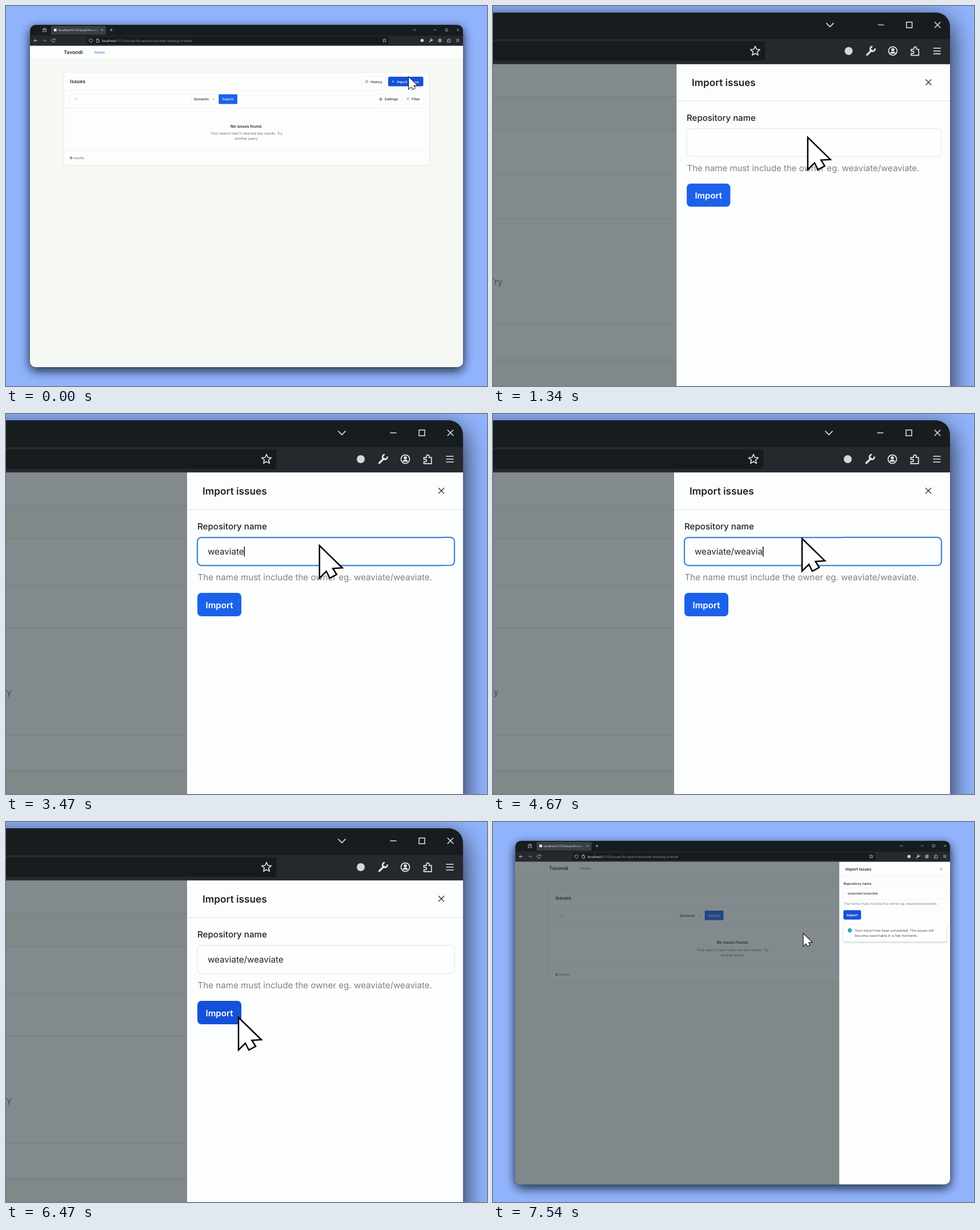
An HTML page that plays this animation: 842 by 665 pixels, repeating every 7600 ms.

```html
<!DOCTYPE html>
<html lang="en">
<head>
<meta charset="utf-8">
<title>Import issues</title>
<style>
  html, body { margin: 0; width: 100%; height: 100%; overflow: hidden; background: #90b3fc; }
  svg { display: block; width: 842px; height: 665px; }
  text { font-family: Inter, "Open Sans", sans-serif; text-rendering: geometricPrecision; white-space: pre; }
  .noto { font-family: "Noto Sans", "Open Sans", sans-serif; }
</style>
</head>
<body>
<svg id="stage" viewBox="0 0 842 665" xmlns="http://www.w3.org/2000/svg"></svg>
<script>
const LOOP = 7600;
const SM = 6.05; // small text size
const BLUE = '#1c61ea', HOVER = '#1551d8';

// ---- markup helpers ----
const rect = (x, y, w, h, fill, rx = 0, more = '') =>
  `<rect x="${x}" y="${y}" width="${w}" height="${h}" rx="${rx}" fill="${fill}" ${more}/>`;
const text = (x, y, str, fill, size = SM, weight = 400, more = '') =>
  `<text x="${x}" y="${y}" font-size="${size}" font-weight="${weight}" fill="${fill}" ${more}>${str}</text>`;
const line = (d, stroke, w = 0.6, more = '') =>
  `<path d="${d}" fill="none" stroke="${stroke}" stroke-width="${w}" ${more}/>`;
const ring = (x, y, r, stroke, w = 0.6) =>
  `<circle cx="${x}" cy="${y}" r="${r}" fill="none" stroke="${stroke}" stroke-width="${w}"/>`;
const cross = (x, y, r, stroke, w) =>
  line(`M${x - r} ${y - r}l${2 * r} ${2 * r}M${x + r} ${y - r}l${-2 * r} ${2 * r}`, stroke, w);
const plus = (x, y, r, stroke, w) =>
  line(`M${x - r} ${y}h${2 * r}M${x} ${y - r}v${2 * r}`, stroke, w);
const chevron = (x, y, r, stroke, w) =>
  line(`M${x - r} ${y - r / 2}l${r} ${r}l${r} ${-r}`, stroke, w);
const button = (x, y, w, h) => rect(x, y, w, h, '#fdfefe', 2.5, 'stroke="#eceef0" stroke-width=".5"');
const rule = (x, y, w) => rect(x, y, w, 0.5, '#e3e7e9');

function browser() {
  const c = '#e4e6e8', dim = '#8b9094', y = 60.2;
  const spikes = Array.from({ length: 10 }, (_, i) => {
    const r = i % 2 ? 1.6 : 3.5, a = i * Math.PI / 5 - Math.PI / 2;
    return `${(662.4 + r * Math.cos(a)).toFixed(2)} ${(60.3 + r * Math.sin(a)).toFixed(2)}`;
  });
  return rect(42, 33, 758, 19, '#171c1f') + rect(42, 51.8, 758, 17.7, '#25292d')
    // tabs
    + line('M64.5 40.5h6v4.4h-6zM65.3 39h4.4M66.3 42.2h2.4', c, 0.7)
    + rect(79, 34.8, 96, 15.4, '#3a3f43', 2)
    + rect(84, 39.8, 4.4, 4.4, '#fff')
    + text(92, 44, 'localhost:5173/issues?hs-sear', 'url(#fade)', 4.96, 400, 'class="noto"')
    + cross(168, 42, 1.6, c, 0.6) + plus(184.3, 42, 2.4, c, 0.7)
    // window controls
    + chevron(715.2, 41.8, 2.6, c, 0.7) + line('M749 41.8h4.4', c, 0.6)
    + line('M769.2 39.8h4v4h-4z', c, 0.6) + cross(791.2, 41.8, 2.1, c, 0.6)
    // navigation
    + line('M55 60.5h-6M51.6 57.9l-2.6 2.6l2.6 2.6', c, 0.8)
    + line('M64.5 60.5h6M67.9 57.9l2.6 2.6l-2.6 2.6', dim, 0.7)
    + line('M85.4 58.6a3 3 0 1 0 .5 2.6M86 57.3v2h-2', c, 0.7)
    // address
    + rect(142, 53.4, 527.4, 13.6, '#171b1e', 1.5)
    + line('M148.5 57.4l2.8 1v2q0 2.2-2.8 3.4q-2.8-1.2-2.8-3.4v-2z', c, 0.7)
    + line('M158.4 57.5h2.6l1.8 1.8v4.2h-4.4zM160.8 57.5v2h2', c, 0.7)
    + text(168, 62.7, 'localhost<tspan fill="#8e9397">:5173/issues?hs-search-box-with-loading-5=test#</tspan>',
        '#eceef0', 5.82, 400, 'class="noto"')
    + line(`M${spikes.join('L')}z`, c, 0.65, 'stroke-linejoin="round"')
    // tools
    + `<circle cx="728.4" cy="${y}" r="2.8" fill="#d5d8da"/>`
    + line('M741.4 62.9l3.2-3.2', c, 1.3, 'stroke-linecap="round"')
    + line('M747 58.4a1.7 1.7 0 1 1-1.8-1.4', c, 1.1)
    + ring(759.6, y, 3, c, 0.7) + `<circle cx="759.6" cy="59.3" r="1.1" fill="${c}"/>`
    + `<path d="M757.6 62a2 1.4 0 0 1 4 0z" fill="${c}"/>`
    + line('M772.6 59h1.8v-.8a.9.9 0 0 1 1.9 0v.8h1.6v4.3h-5.3v-1.3h1a.8.8 0 0 0 0-1.7h-1z', c, 0.7)
    + line('M788.2 58.2h5.2M788.2 60.2h5.2M788.2 62.2h5.2', c, 0.65);
}

function page() {
  const ink = '#23272b', grey = '#666b70', ic = '#50565b';
  return rect(42, 69.4, 758, 563, '#f6f8f4') + rect(42, 69.4, 758, 23.4, '#fcfdfd') + rule(42, 92.4, 758)
    + text(101, 84, 'Tavondi', ink, 8.7, 600) + text(154.3, 83.3, 'Issues', '#2f7fd6', SM, 500)
    + rect(101.5, 117, 639.5, 161.2, '#cfd5d5', 3, 'filter="url(#soft)" opacity=".7"')
    + rect(101.5, 116.6, 639.5, 161.4, '#fcfdfd', 3, 'stroke="#e9ecec" stroke-width=".4"')
    + rule(101.5, 147.6, 639.5) + rule(101.5, 178.2, 639.5) + rule(101.5, 253.2, 639.5)
    + text(112, 135.3, 'Issues', ink, 8.64, 600)
    + button(622, 124, 42, 16.4) + ring(631.5, 132.2, 2.3, ic) + line('M631.5 130.8v1.6h1.2', ic, 0.5)
    + text(638, 134.5, 'History', ink, SM, 500)
    + rect(669, 123.8, 61.5, 16.6, HOVER, 2.5) + plus(677.5, 132.2, 2, '#fff', 0.6)
    + text(684, 134.5, 'Import issues', '#fff', SM, 500)
    + rect(112, 154.8, 260, 16.6, '#fdfefe', 2.5, 'stroke="#e3e6e8" stroke-width=".5"')
    + ring(122.6, 162.7, 2.1, '#a3a8ac', 0.5) + line('M124.1 164.2l1.6 1.6', '#a3a8ac', 0.5)
    + rect(323.8, 154.8, 0.5, 16.6, '#e3e6e8')
    + text(328.7, 165.3, 'Semantic', ink, SM, 500) + chevron(363, 163.1, 1.7, ic, 0.6)
    + rect(372.3, 154.6, 32.6, 16.8, BLUE, 1) + text(388.5, 165.3, 'Search', '#fff', SM, 500, 'text-anchor="middle"')
    + button(647, 154.8, 45, 16.6) + ring(656, 163, 2, ic, 0.9) + ring(656, 163, 0.8, ic, 0.5)
    + text(662.5, 165.3, 'Settings', ink, SM, 500)
    + button(695, 154.8, 35.5, 16.6) + line('M701 161.3h5M702 163h3M702.9 164.7h1.2', ic, 0.6)
    + text(710, 165.3, 'Filter', ink, SM, 500)
    + text(421, 212.5, 'No issues found.', ink, 6.9, 600, 'text-anchor="middle"')
    + text(421.3, 225.3, "Your search hasn't returned any results. Try", grey, SM, 400, 'text-anchor="middle"')
    + text(421, 234, 'another query.', grey, SM, 400, 'text-anchor="middle"')
    + text(112, 268.2, '<tspan font-weight="600" fill="#23272b">0</tspan> results', grey);
}

function drawer() {
  const ink = '#1d2226';
  return rect(606.8, 69.4, 194, 563, '#fcfdfd') + rule(606.8, 95.2, 194)
    + text(617.6, 84.9, 'Import issues', ink, 6.9, 600) + cross(784.8, 82.3, 2, '#3a3f43', 0.6)
    + text(614, 109.6, 'Repository name', ink, SM, 500)
    + rect(614, 115, 180, 19.6, '#fdfefe', 2.8, 'id="field"')
    + text(621.2, 127.2, '', ink, SM, 400, 'id="typed"') + rect(621, 121.4, 0.6, 7, '#111', 0, 'id="caret"')
    + text(614.2, 145, 'The name must include the owner eg. weaviate/weaviate.', '#7c8287')
    + rect(614, 153.8, 30.8, 16.4, BLUE, 2.8, 'id="submit"')
    + text(629.4, 164.5, 'Import', '#fff', SM, 600, 'text-anchor="middle"')
    + '<g id="notice">'
    + rect(614.5, 179.2, 179.5, 31, '#9aa3a8', 3, 'filter="url(#soft)" opacity=".55"')
    + rect(614.3, 177.6, 179.7, 31, '#fdfefe', 3, 'stroke="#eceff0" stroke-width=".5"')
    + '<circle cx="625.2" cy="189" r="3.6" fill="#2a9fb0"/>' + line('M623.7 189.1l1.1 1.1l2-2.2', '#d9f3f5', 0.6)
    + text(633.8, 191.3, 'Your import has been scheduled. The issues will', '#4c5257')
    + text(633.8, 200, 'become searchable in a few moments.', '#4c5257') + '</g>';
}

const stage = document.getElementById('stage');
stage.innerHTML = `
  <defs>
    <clipPath id="frame"><rect x="42" y="33" width="758" height="599" rx="10"/></clipPath>
    <filter id="glow" filterUnits="userSpaceOnUse" x="-20" y="-20" width="900" height="740"><feGaussianBlur stdDeviation="9"/></filter>
    <filter id="soft" filterUnits="userSpaceOnUse" x="90" y="105" width="720" height="190"><feGaussianBlur stdDeviation="1.5"/></filter>
    <linearGradient id="fade" gradientUnits="userSpaceOnUse" x1="148" x2="161">
      <stop stop-color="#eceef0"/><stop offset="1" stop-color="#5a5f63"/>
    </linearGradient>
  </defs>
  ${rect(0, 0, 842, 665, '#90b3fc')}
  <g id="world">
    ${rect(42, 39, 758, 599, '#05080f', 10, 'filter="url(#glow)" opacity=".85"')}
    <g clip-path="url(#frame)">
      ${page()}${rect(42, 69.4, 758, 563, '#283339', 0, 'id="veil"')}
      <g id="drawer">${drawer()}</g>${browser()}
    </g>
    <path id="pointer" d="M0 0V22.8L4.8 18L7.2 22.8L12 20.2L9.4 16L16 15.6Z" fill="#fff" stroke="#000" stroke-width="1"/>
  </g>`;
const $ = id => document.getElementById(id);
const [world, veil, panel, field, typed, caret, submit, notice, pointer] =
  ['world', 'veil', 'drawer', 'field', 'typed', 'caret', 'submit', 'notice', 'pointer'].map($);

// ---- timing ----
const NAME = 'weaviate/weaviate';
const KEYS = [1940, 2070, 2200, 2740, 3070, 3200, 3340, 3470, 3800, 3930, 4070, 4340, 4440, 4540, 4640, 4800, 4940];
const FOCUS = 1500, BLUR = 6100, NOTICE = 6740;
// time, x, y
const PATH = [
  [0, 704.5, 123.5], [400, 704.5, 123.5], [900, 699.5, 121.4], [2300, 699.5, 120.7], [4250, 699.5, 120.7],
  [4620, 696.4, 115.8], [5200, 696.4, 115.8], [6000, 642.8, 165.4], [6720, 642.8, 165.4], [7420, 544, 194.4], [LOOP, 544, 194.4]
];

const clamp = v => Math.min(1, Math.max(0, v));
const mix = (a, b, p) => a + (b - a) * p;
const ease = p => p * p * (3 - 2 * p);
const spring = (t, start) => {
  const k = Math.max(0, t - start) * 0.0134;
  return 1 - (1 + k) * Math.exp(-k);
};

function pointerAt(t) {
  const i = PATH.findIndex(k => k[0] > t), a = PATH[i - 1], b = PATH[i];
  const p = ease((t - a[0]) / (b[0] - a[0]));
  return [mix(a[1], b[1], p), mix(a[2], b[2], p)];
}

// The window's top right corner steers the camera.
function camera(t) {
  const out = spring(t, 6933), zoom = spring(t, 879) * (1 - out);
  const sway = 4 * out * (1 - out);
  const s = 1 + 1.5 * zoom, x = 800 + 11 * sway, y = 33 - 22 * zoom - 4.5 * sway;
  return `translate(${x} ${y}) scale(${s}) translate(-800 -33)`;
}

function draw(t) {
  world.setAttribute('transform', camera(t));

  const open = ease(clamp((t - 340) / 420));
  veil.setAttribute('opacity', 0.57 * open);
  panel.setAttribute('transform', `translate(${194 * (1 - open)} 0)`);

  const count = KEYS.filter(k => k <= t).length;
  const str = NAME.slice(0, count);
  if (typed.textContent !== str) typed.textContent = str;

  const focused = t >= FOCUS && t < BLUR;
  field.setAttribute('stroke', focused ? '#4285cf' : '#e6e9eb');
  field.setAttribute('stroke-width', focused ? 0.9 : 0.5);
  const last = count ? KEYS[count - 1] : FOCUS;
  caret.setAttribute('opacity', focused && (t - last) % 1000 < 500 ? 1 : 0);
  caret.setAttribute('x', 621.2 + (count ? typed.getComputedTextLength() : 0));

  const [x, y] = pointerAt(t);
  pointer.setAttribute('transform', `translate(${x} ${y})`);
  submit.setAttribute('fill', t > 5880 ? HOVER : BLUE);
  notice.setAttribute('opacity', t >= NOTICE ? 1 : 0);
}

function tick() {
  draw(performance.now() % LOOP);
  requestAnimationFrame(tick);
}
tick();
</script>
</body>
</html>
```
